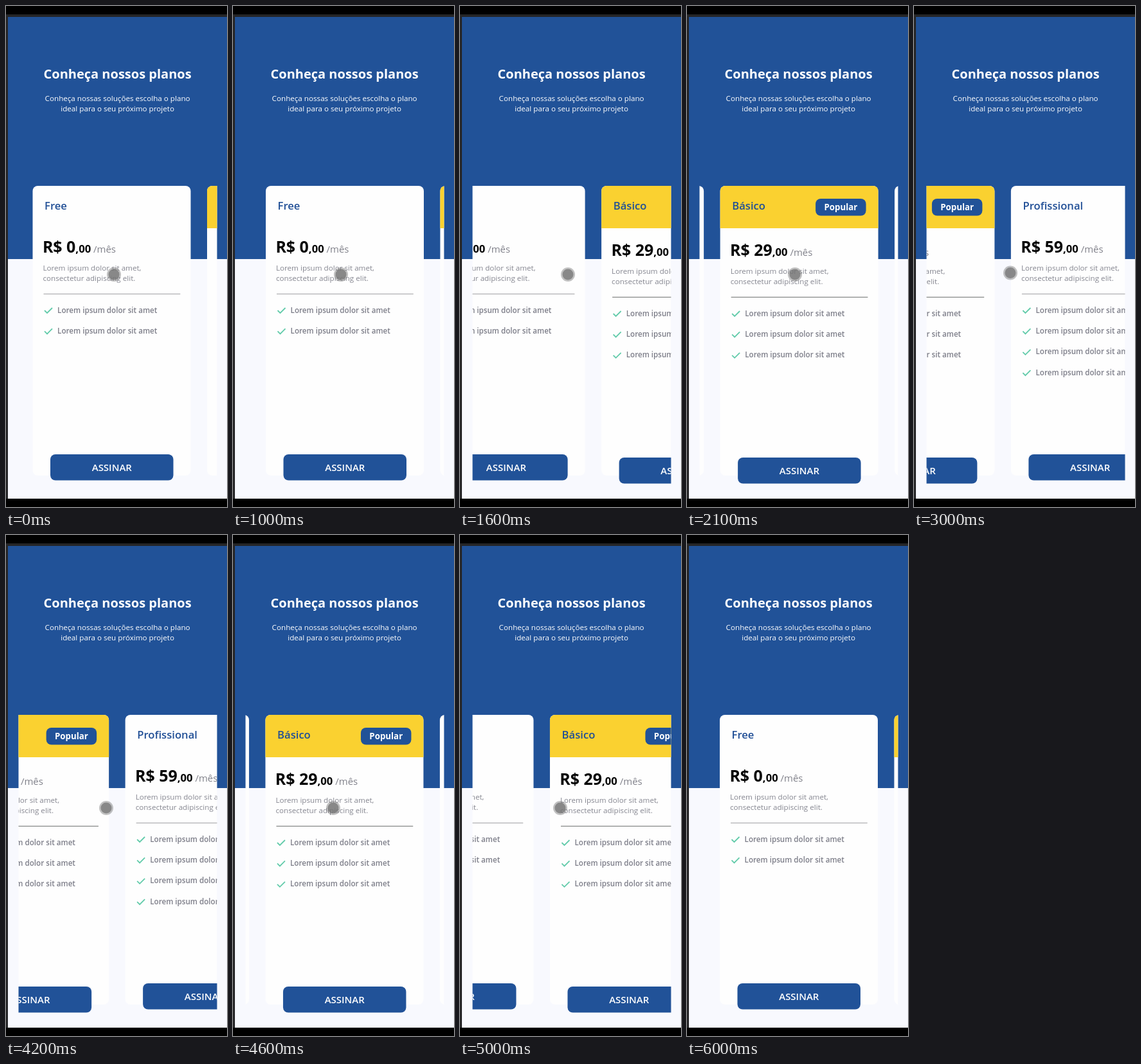
An HTML page that plays this animation: 344x780 px, repeating every 7400 ms.

```html
<!DOCTYPE html>
<html lang="pt">
<head>
<meta charset="utf-8">
<style>
  html, body { margin: 0; width: 100%; height: 100%; overflow: hidden; background: #000; }
  svg { display: block; width: 344px; height: 780px; font-family: "Open Sans", sans-serif; }
  .title { font: 700 20px "Open Sans", sans-serif; }
  .sub { font-size: 11.65px; }
  .head { fill: #fff; text-anchor: middle; }
  .name { font-size: 16.64px; font-weight: 600; fill: #214f96; }
  .price { font-size: 24.96px; font-weight: 700; fill: #060606; }
  .cents { font-size: 16.64px; }
  .month { font-size: 14.98px; font-weight: 400; fill: #80818a; }
  .desc { font-size: 11.65px; fill: #858690; }
  .item { font-size: 11.65px; font-weight: 600; fill: #7d7e89; }
  .check { fill: none; stroke: #62cbaa; stroke-width: 1.8; }
  .btn { font-size: 14.98px; font-weight: 600; fill: #fff; text-anchor: middle; }
  .tag { font-size: 13.3px; font-weight: 700; fill: #fff; text-anchor: middle; }
</style>
</head>
<body>
<svg viewBox="0 0 344 780">
  <defs>
    <clipPath id="view"><rect x="19.5" y="270" width="309" height="490"/></clipPath>
  </defs>
  <rect width="344" height="780" fill="#000"/>
  <rect y="13" width="344" height="754" fill="#252527"/>
  <rect x="3" y="17" width="341" height="750" fill="#f8f9fe"/>
  <rect x="3" y="17" width="341" height="377" fill="#215298"/>
  <text class="head title" x="173.6" y="113">Conheça nossos planos</text>
  <text class="head sub" x="173.6" y="148">Conheça nossas soluções escolha o plano</text>
  <text class="head sub" x="173.6" y="164.3">ideal para o seu próximo projeto</text>
  <g clip-path="url(#view)"><g id="track"></g></g>
  <g id="touch">
    <circle r="11" fill="#777" fill-opacity=".45"/>
    <circle r="8.5" fill="#717171" fill-opacity=".72"/>
  </g>
</svg>
<script>
const LOOP = 7400, STEP = 100, PITCH = 271.5, LEFT = 51;
const track = document.getElementById('track');
const touch = document.getElementById('touch');

const plans = [
  { name: 'Free', price: 0, items: 2 },
  { name: 'Básico', price: 29, items: 3, popular: true },
  { name: 'Profissional', price: 59, items: 4 }
];

function card({ name, price, items, popular }, i) {
  const dy = popular ? 5 : 0;
  const rows = Array.from({ length: items }, (_, k) => {
    const y = 477.6 + k * 32.4;
    return `<path class="check" d="M18.5 ${y - 3.6}l4 4 8-8"/>
      <text class="item" x="38.6" y="${y}">Lorem ipsum dolor sit amet</text>`;
  }).join('');
  const banner = `<path d="M0 346V288a8 8 0 0 1 8-8H238a8 8 0 0 1 8 8V346z" fill="#fad130"/>
    <rect x="148.5" y="300" width="78.5" height="26.5" rx="8" fill="#215298"/>
    <text class="tag" x="187.8" y="318">Popular</text>`;
  return `<g transform="translate(${LEFT + i * PITCH} 0)">
    <rect y="280" width="246" height="451" rx="8" fill="#fefefe"/>
    ${popular ? banner : ''}
    <text class="name" x="18.6" y="316.6">${name}</text>
    <g transform="translate(0 ${dy})">
      <text class="price" x="15.4" y="383.7">R$ ${price}<tspan class="cents">,00</tspan><tspan class="month"> /mês</tspan></text>
      <text class="desc" x="16" y="412">Lorem ipsum dolor sit amet,</text>
      <text class="desc" x="16" y="428.2">consectetur adipiscing elit.</text>
      <path d="M17 448.3H229.8" stroke="${popular ? '#868987' : '#b0b0b2'}" stroke-width="1.3"/>
      ${rows}
      <rect x="27.5" y="698" width="191.5" height="40.5" rx="8" fill="#215298"/>
      <text class="btn" x="123.3" y="723.8">ASSINAR</text>
    </g>
  </g>`;
}
track.innerHTML = plans.map(card).join('');

// Each swipe: last resting time, direction, time scale
const swipes = [[1300, 1, 400], [2600, 1, 400], [3900, -1, 347], [4700, -1, 428]];

// Slow start, fast middle, snap with a soft tail
const snap = (t, scale) => t <= 0 ? 0 : 1 - Math.exp(-Math.pow(t / scale, 2.6));

function scrollAt(t) {
  const settle = -9.5 * Math.pow(Math.max(0, 1 - t / 400), 2);
  return swipes.reduce((x, [start, dir, scale]) =>
    x + dir * PITCH * snap(t - start, scale), -settle);
}

function touchAt(t) {
  if (t < 2700) return [168, 418];
  if (t < 4000) return [150, 415.5];
  return [156, 425];
}

function draw(time) {
  const t = Math.floor(time % LOOP / STEP) * STEP;
  track.setAttribute('transform', `translate(${-scrollAt(t).toFixed(2)} 0)`);
  touch.setAttribute('transform', `translate(${touchAt(t)})`);
  touch.style.display = t < 5800 ? '' : 'none';
}

const begin = performance.now();
function tick() {
  draw(performance.now() - begin);
  requestAnimationFrame(tick);
}
tick();
</script>
</body>
</html>
```
